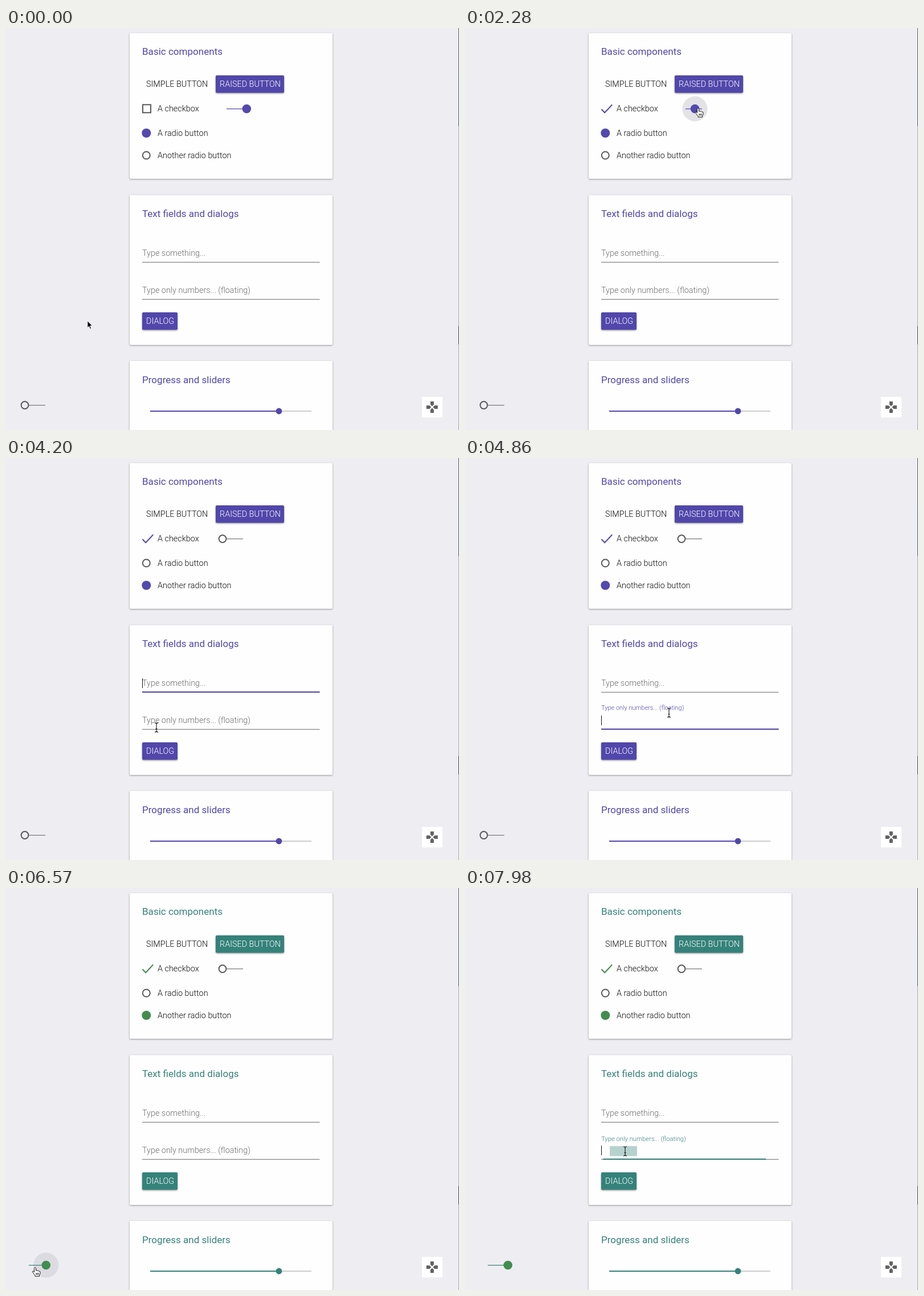
Animation, 795 px wide and 704 px high, one loop 8 s. Source, as an HTML page:

```html
<!DOCTYPE html>
<html lang="en">
<head>
<meta charset="utf-8">
<title>Component demo</title>
<style>
  html, body { margin: 0; width: 100%; height: 100%; overflow: hidden; background: #eeedf2; }
  svg { display: block; width: 795px; height: 704px; --primary: #5147ab; --accent: #5349ae; }
  svg.green { --primary: #35827a; --accent: #418d4e; }
  text { font: 300 14.4px Roboto, sans-serif; fill: #0c0c0c; }
  .title { font-size: 17.05px; font-weight: 400; fill: var(--primary); }
  .card { fill: #fefefe; filter: drop-shadow(0 1.5px 1.8px rgba(0,0,0,.38)); }
  .raised { fill: var(--primary); filter: drop-shadow(0 1.5px 1.8px rgba(0,0,0,.45)); }
  .light { fill: #fff; }
  .primary { fill: var(--primary); }
  .accent { fill: var(--accent); }
  .ring { fill: none; stroke: #58585c; stroke-width: 2; }
  .ripple { fill: #3a3650; }
  .rule { fill: #757575; }
  .caret { fill: #111; }
</style>
</head>
<body>
<svg id="stage" viewBox="0 0 795 704"></svg>
<script>
const LOOP = 8000;
const stage = document.getElementById('stage');

const clamp = v => Math.max(0, Math.min(1, v));
const span = (t, start, length) => clamp((t - start) / length);
const lerp = (a, b, p) => a + (b - a) * p;
const easeOut = p => 1 - (1 - p) ** 3;
const easeInOut = p => p * p * (3 - 2 * p);

function set(el, attrs) {
  for (const key in attrs) el.setAttribute(key, attrs[key]);
  return el;
}
function add(tag, attrs, parent = stage) {
  return parent.appendChild(set(document.createElementNS('http://www.w3.org/2000/svg', tag), attrs));
}
const rect = (x, y, width, height, attrs) => add('rect', { x, y, width, height, ...attrs });
const circle = (cx, cy, r, cls) => add('circle', { cx, cy, r, class: cls });
function label(x, y, content, cls = '') {
  const el = add('text', { x, y, class: cls });
  el.textContent = content;
  return el;
}
const show = (el, on) => set(el, { visibility: on ? 'visible' : 'hidden' });

// Window edge
rect(794, 0, 1, 704, { fill: '#a5a5ad' });
rect(794, 0, 1, 80, { fill: '#55555c' });
rect(794, 80, 1, 92, { fill: '#386178' });
rect(794, 522, 1, 32, { fill: '#44444a' });

// Cards
for (const [y, height] of [[9, 255], [292.5, 262.5], [583, 160]])
  rect(217, y, 356, height, { rx: 2, class: 'card' });
label(239, 47, 'Basic components', 'title');
label(239, 330.5, 'Text fields and dialogs', 'title');
label(239, 621.5, 'Progress and sliders', 'title');

// Buttons
label(246, 103, 'SIMPLE BUTTON');
rect(368, 83, 120, 30.5, { rx: 2, class: 'raised' });
label(375, 103, 'RAISED BUTTON', 'light');
rect(239, 498, 62, 30.5, { rx: 2, class: 'raised' });
label(246, 518, 'DIALOG', 'light');

// Slider
rect(253, 670, 226, 2, { class: 'primary' });
rect(479, 670.3, 57, 1.4, { fill: '#b9b9bc' });
circle(479, 671, 5.4, 'primary');

// Corner icon
rect(730, 646, 36, 36, { fill: '#fff' });
add('path', {
  transform: 'translate(735.8 652)', fill: '#616161',
  d: 'M15 7.5V2H9v5.5l3 3zM7.5 9H2v6h5.5l3-3zM9 16.5V22h6v-5.5l-3-3zM16.5 9l-3 3 3 3H22V9z'
});

function makeRipple(cx, cy, down, up) {
  const el = circle(cx, cy, 0, 'ripple');
  return (t, x = cx) => set(el, {
    cx: x,
    r: t < down ? 0 : 22 * easeOut(span(t, down, 180)),
    opacity: 0.145 * (1 - span(t, up, 280))
  });
}

function makeCheckbox(x, y, down, up) {
  const ripple = makeRipple(x, y, down, up);
  const box = rect(-7, -7, 14, 14, { class: 'ring' });
  const tick = add('path', {
    d: 'M-7.5 1L-1.8 7L11.2 -7', fill: 'none', stroke: 'var(--accent)', 'stroke-width': 2
  });
  label(266, y + 4.7, 'A checkbox');
  return t => {
    ripple(t);
    const shrink = span(t, up, 140), grow = span(t, up + 140, 140);
    set(box, { transform: `translate(${x} ${y}) rotate(${45 * shrink}) scale(${1 - shrink})` });
    set(tick, { transform: `translate(${x} ${y}) scale(${grow})` });
    show(box, shrink < 1);
    show(tick, grow > 0);
  };
}

function makeRadio(y, content, selected) {
  const ring = circle(246.3, y, 6.5, 'ring');
  const dot = circle(246.3, y, 0, 'accent');
  label(266, y + 5, content);
  return t => {
    const p = selected(t);
    set(dot, { r: 8 * p });
    show(ring, p < 1);
  };
}

function makeToggle(x, y, down, up, from, to) {
  const ripple = makeRipple(x, y, down, up + 50);
  const track = rect(x + 7, y - 0.5, 29, 1.2, {});
  const ring = circle(x, y, 6.4, 'ring');
  const knob = circle(x, y, 7.8, 'accent');
  return t => {
    const p = lerp(from, to, span(t, up, 160));
    const cx = x + 42.3 * p;
    ripple(t, cx);
    set(knob, { cx });
    show(knob, p > 0);
    show(ring, p === 0);
    set(track, { fill: p > 0 ? 'var(--primary)' : '#77777b' });
  };
}

// focuses: list of [focus time, blur time, click x]
function makeField(y, content, floating, focuses) {
  const text = label(239, y - 11, content);
  rect(239, y - 0.3, 311.5, 1.1, { class: 'rule' });
  const line = rect(239, y - 1.2, 0, 2, { class: 'primary' });
  const flash = rect(239, y - 23, 0, 17.5, { class: 'primary', opacity: 0.36 });
  const caret = rect(239, y - 24, 1, 17, { class: 'caret' });
  return t => {
    const [focus, blur, clickX] = focuses.findLast(f => t >= f[0]) || [Infinity, Infinity, 239];
    const active = t >= focus && t < blur;
    const p = t >= focus ? easeOut(span(t, focus, 250)) : 0;
    const fade = 1 - span(t, blur, 150);
    const left = lerp(clickX, 239, p), right = lerp(clickX, 550.5, p);
    set(line, { x: left, width: p ? right - left : 0, opacity: fade });

    const slide = span(t, focus, 220);
    set(flash, { x: lerp(clickX, 239, slide), width: active ? 133 * (1 - slide) : 0 });
    show(caret, active && Math.floor((t - focus) / 505) % 2 === 0);

    const lift = floating ? p * (1 - easeOut(span(t, blur, 250))) : 0;
    set(text, { y: y - 11 - 23 * lift });
    text.style.fontSize = lerp(14.4, 11, lift) + 'px';
    text.style.fill = floating && active ? 'var(--primary)' : '#6c6c6c';
  };
}

const radioSwap = t => easeInOut(span(t, 3060, 160));
const parts = [
  makeCheckbox(247, 141.3, 1150, 1240),
  makeToggle(380, 141.5, 2080, 2210, 1, 0),
  makeRipple(246.3, 223, 2970, 3080),
  makeRadio(184, 'A radio button', t => 1 - radioSwap(t)),
  makeRadio(223, 'Another radio button', radioSwap),
  makeField(410, 'Type something...', false, [[3780, 4490, 250]]),
  makeField(475, 'Type only numbers... (floating)', true, [[4500, 6360, 268], [7840, LOOP, 281]]),
  makeToggle(33, 660.5, 6360, 6430, 0, 1)
];

// Pointer: [time, x, y], eased between stops
const route = [
  [0, 143, 513], [60, 143, 513], [960, 247, 151], [1560, 247, 151],
  [2080, 409, 140], [2430, 409, 140], [2930, 247, 222], [3240, 247, 222],
  [3720, 250, 397], [3930, 250, 397], [4190, 264, 472], [4350, 268, 466],
  [4600, 268, 466], [4860, 358, 446], [5150, 358, 446], [5730, 51, 664],
  [6890, 51, 664], [7340, 281, 455], [7560, 281, 461], [LOOP, 281, 461]
];
const handAreas = [
  [236, 126, 345, 160], [368, 122, 432, 160], [236, 172, 398, 236],
  [239, 498, 301, 529], [22, 640, 86, 682], [368, 83, 488, 114]
];
const textAreas = [[239, 382, 550, 411], [239, 444, 550, 476]];
const pointers = {
  arrow: add('path', {
    d: 'M0 0V12L2.8 9.4L4.6 14L6.6 13.2L4.7 8.7L8.3 8.4Z',
    fill: '#000', stroke: '#fff', 'stroke-width': 0.8
  }),
  hand: add('path', {
    d: 'M-1.5 1.5Q0-1 1.5 1.5V6Q3 4.8 4 6.3Q5.8 5.3 6.6 7Q8.6 6.3 9 8.3V11Q8.5 13 7.5 14V16H0V14.5' +
       'Q-1.5 13-2.5 11L-4.7 8.5Q-5 6.8-3.2 7L-1.5 8.6ZM2 10V13.5M4 10V13.5M6 10V13.5',
    fill: '#fff', stroke: '#111', 'stroke-width': 1
  }),
  beam: add('path', {
    d: 'M-3-8Q0-8 0-6Q0-8 3-8M0-6.5V6.5M-3 8Q0 8 0 6Q0 8 3 8M-1.5 2.5H1.5',
    fill: 'none', stroke: '#111', 'stroke-width': 1.1
  })
};

function movePointer(t) {
  const i = Math.max(1, route.findIndex(stop => stop[0] > t));
  const [t0, x0, y0] = route[i - 1], [t1, x1, y1] = route[i];
  const p = easeInOut(span(t, t0, t1 - t0));
  const x = lerp(x0, x1, p), y = lerp(y0, y1, p);
  const inside = ([l, top, r, b]) => x >= l && x <= r && y >= top && y <= b;
  const kind = handAreas.some(inside) ? 'hand' : textAreas.some(inside) ? 'beam' : 'arrow';
  for (const name in pointers) show(pointers[name], name === kind);
  set(pointers[kind], { transform: `translate(${x} ${y})` });
}

function render(t) {
  stage.classList.toggle('green', t >= 6480);
  parts.forEach(update => update(t));
  movePointer(t);
}

const start = performance.now();
function tick() {
  render((performance.now() - start) % LOOP);
  requestAnimationFrame(tick);
}
tick();
</script>
</body>
</html>
```
